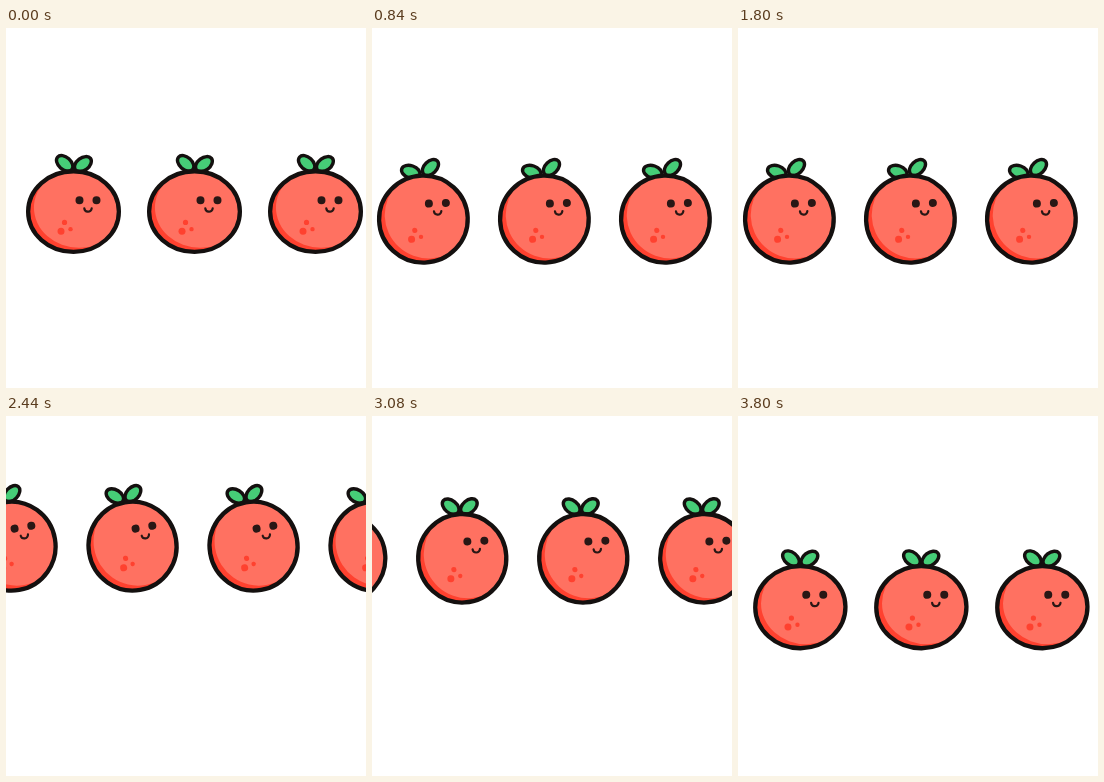
Animation, 360 px wide and 360 px high, one loop 3840 ms. Source, as an HTML page with a canvas:

```html
<!DOCTYPE html>
<html lang="en">
<head>
<meta charset="utf-8">
<title>Bouncing fruit</title>
<style>
html, body { margin: 0; height: 100%; overflow: hidden; background: #fff; }
canvas { display: block; }
</style>
</head>
<body>
<canvas id="stage" width="360" height="360"></canvas>
<script>
const ctx = document.getElementById('stage').getContext('2d');
const PERIOD = 960, STEP = 40, GAP = 121;
const INK = '#14100f', FACE = '#291715', RED = '#ff412f', PINK = '#ff7161', GREEN = '#46cd77';
const { PI, cos, abs } = Math;
const rad = deg => deg * PI / 180;

// Cosine wave peaking at the given phase, and a pulse made from its upper half
const wave = (p, peak) => cos(2 * PI * (p - peak));
const pulse = (p, peak, power) => Math.max(0, wave(p, peak)) ** power;

function ellipse(x, y, rx, ry, fill, line) {
  ctx.beginPath();
  ctx.ellipse(x, y, rx, ry, 0, 0, 2 * PI);
  if (fill) {
    ctx.fillStyle = fill;
    ctx.fill();
  }
  if (line) {
    ctx.lineWidth = line;
    ctx.strokeStyle = INK;
    ctx.stroke();
  }
}
const dot = (x, y, r, fill) => ellipse(x, y, r, r, fill);

function leaf(y, side, angle) {
  ctx.save();
  ctx.translate(0, y);
  ctx.scale(side, 1);
  ctx.rotate(-rad(angle));
  ellipse(11.8, 0, 9.5, 6.2, GREEN, 3.4);
  ctx.restore();
}

function fruit(x, y, { squash, tilt, wag }) {
  const rx = 44 + 1.4 * squash, ry = 44.5 - 4.3 * squash;
  const faceY = -16.7 + 5.6 * squash;
  ctx.save();
  ctx.translate(x, y);
  ctx.rotate(rad(tilt));
  leaf(-ry, -1, 42 - 26 * wag);
  leaf(-ry, 1, 37 + 6 * wag);

  ctx.save();
  ellipse(0, 0, rx, ry, RED);
  ctx.clip();
  ellipse(5.8, -4, rx, ry, PINK);
  ctx.restore();
  ellipse(0, 0, rx, ry, null, 4.3);

  dot(-12.5, 19.8, 3.5, RED);
  dot(-9, 10.9, 2.6, RED);
  dot(-3, 17.6, 2.2, RED);

  dot(6, faceY, 4, FACE);
  dot(23, faceY, 4, FACE);
  ctx.beginPath();
  ctx.arc(14.5, faceY + 7.7, 3.7, rad(5), rad(175));
  ctx.lineWidth = 2.2;
  ctx.lineCap = 'round';
  ctx.strokeStyle = FACE;
  ctx.stroke();
  ctx.restore();
}

function draw(now) {
  const t = Math.floor(now / STEP) * STEP % PERIOD, p = t / PERIOD;

  // Distance in time from the apex: 0 at the top, 1 on the ground
  let fall = abs(t - 400) / (PERIOD / 2);
  if (fall > 1) fall = 2 - fall;
  const y = 122.7 + 44 * (1 - cos(0.75 * PI * fall));
  const x = 64.2 + GAP * p + 3.3 * wave(p, 0);
  const pose = {
    squash: pulse(p, 0.02, 3),
    tilt: 5 * (wave(p, 0.02) - 1),
    wag: pulse(p, 0.84, 8)
  };

  ctx.fillStyle = '#fff';
  ctx.fillRect(0, 0, 360, 360);
  for (let i = -2; i < 4; i++) fruit(x + i * GAP, y, pose);
}

const start = performance.now();
function tick() {
  draw(performance.now() - start);
  requestAnimationFrame(tick);
}
tick();
</script>
</body>
</html>
```
